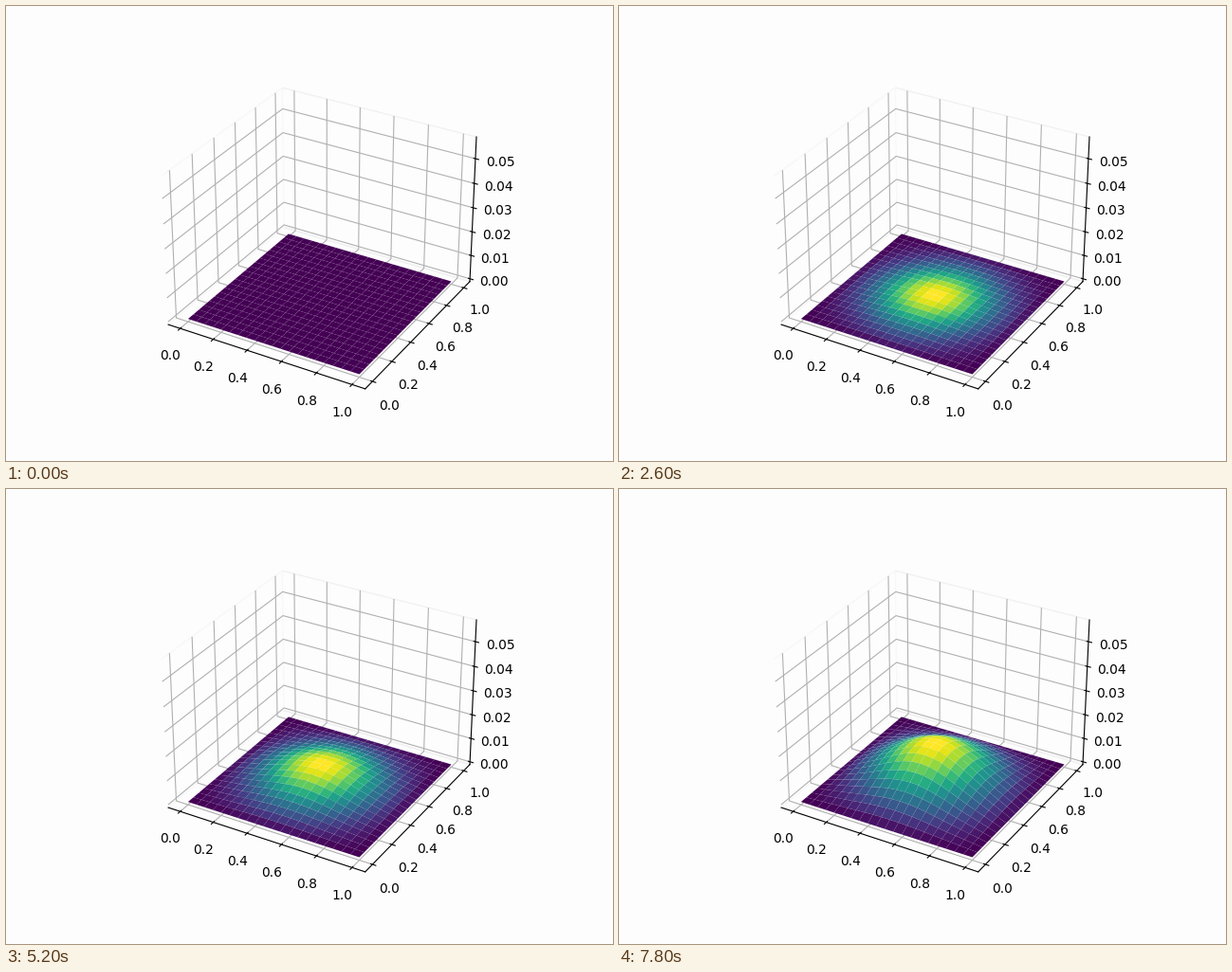
Animation of 640x480 px, one loop 8000 ms. Source, as a matplotlib script:

```python
import numpy as np
import matplotlib.pyplot as plt
from matplotlib.animation import FuncAnimation

FRAMES, INTERVAL = 40, 200
CELLS, DT = 20, 0.005
Z_MAX = 0.0575
PAPER = "#fdfdfd"

axis = np.linspace(0, 1, CELLS + 1)
X, Y = np.meshgrid(axis, axis)
H2 = (axis[1] - axis[0]) ** 2


def laplacian(u):
    out = np.zeros_like(u)
    out[1:-1, 1:-1] = (u[2:, 1:-1] + u[:-2, 1:-1] + u[1:-1, 2:]
                       + u[1:-1, :-2] - 4 * u[1:-1, 1:-1]) / H2
    return out


def solve():
    """Membrane clamped at its rim, at rest, pushed up by a steady bump."""
    force = np.zeros_like(X)
    force[1:-1, 1:-1] = np.exp(-10 * ((X - 0.5) ** 2 + (Y - 0.5) ** 2))[1:-1, 1:-1]
    states = [np.zeros_like(X), 0.5 * DT ** 2 * force]
    while len(states) < FRAMES:
        prev, cur = states[-2:]
        states.append(2 * cur - prev + DT ** 2 * (laplacian(cur) + force))
    return states


def padded(low, high, share=1 / 48):
    pad = (high - low) * share
    return low - pad, high + pad


states = solve()
fig = plt.figure(figsize=(6.4, 4.8), dpi=100, facecolor=PAPER)
ax = fig.add_subplot(projection="3d", facecolor=PAPER)
ax.set_xlim(*padded(-0.05, 1.05))
ax.set_ylim(*padded(-0.05, 1.05))
ax.set_zlim(*padded(0, Z_MAX))
for side in (ax.xaxis, ax.yaxis, ax.zaxis):
    side.pane.set_facecolor(PAPER)

surface = None


def draw(i):
    global surface
    if surface is not None:
        surface.remove()
    surface = ax.plot_surface(X, Y, states[i], cmap="viridis")
    return (surface,)


anim = FuncAnimation(fig, draw, frames=FRAMES, interval=INTERVAL,
                     init_func=lambda: draw(0), repeat=True, repeat_delay=0)
plt.show()
```
